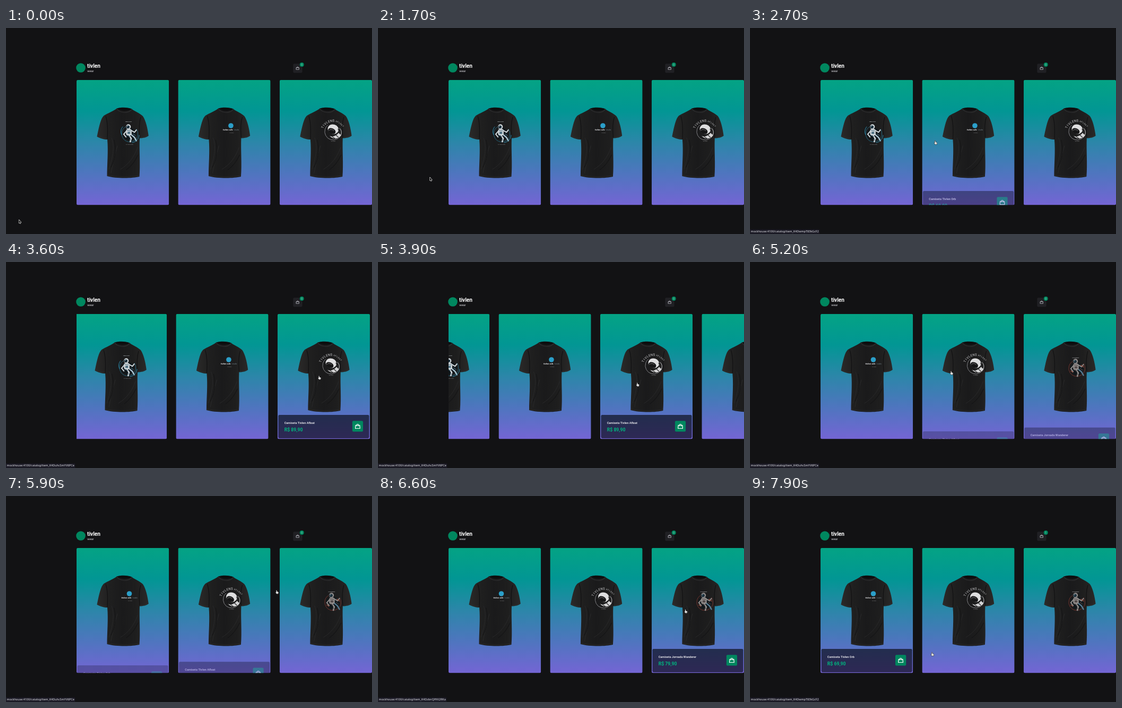
Recreate the animation shown at these times as an HTML page with a canvas. Size 690 by 388 pixels, loop 8000 ms.

```html
<!DOCTYPE html>
<html lang="pt-BR">
<head>
<meta charset="utf-8">
<title>Shop carousel</title>
<style>
html, body { margin: 0; width: 100%; height: 100%; overflow: hidden; background: #121214; }
canvas { display: block; width: 690px; height: 388px; }
</style>
</head>
<body>
<canvas id="stage" width="690" height="388"></canvas>
<script>
const stage = document.getElementById('stage').getContext('2d');
const layer = new OffscreenCanvas(690, 388).getContext('2d');
let ctx = stage;
const LOOP = 8000, STEP = 100;
const LEFT = 133, TOP = 97.8, CARD_W = 174.2, CARD_H = 235.6, PITCH = 191.43;
const SANS = 'Roboto, sans-serif';
const HOST = 'mockhouse:4100/catalog/item_';

const products = [
  { name: 'Camiseta Tivlen Abroad', price: 'R$ 79,90', id: 'K4DpqsWmVX3LTe', print: blueDiver },
  { name: 'Camiseta Tivlen Orb', price: 'R$ 69,90', id: 'K4DwmpT83kGcF2', print: orbPrint },
  { name: 'Camiseta Tivlen Afloat', price: 'R$ 89,90', id: 'K4DuhcSmYV6PCe', print: helmetPrint },
  { name: 'Camiseta Jornada Wanderer', price: 'R$ 79,90', id: 'K4DzbnQfHX2RKa', print: redDiver }
];

// product, time the pointer enters, time it leaves
const visits = [
  [0, 1900, 2490], [1, 2585, 3050], [2, 3130, 4510], [3, 4560, 5102], [2, 5118, 5250],
  [1, 5270, 5782], [2, 5799, 5900], [3, 5930, 6760], [2, 6785, 7020], [1, 7050, 9000]
];

// time, x, y of the pointer
const path = [
  [0, 26, 365], [1050, 26, 365], [1500, 70, 318], [1900, 136, 250], [2250, 220, 204],
  [2500, 306, 206], [2700, 350, 216], [3050, 505, 214], [3300, 586, 217], [3450, 595, 218],
  [3600, 591, 218], [4100, 427, 238], [4350, 412, 238], [4600, 540, 220], [4800, 600, 208],
  [5000, 575, 206], [5100, 506, 207], [5200, 380, 209], [5400, 265, 202], [5600, 235, 195],
  [5780, 300, 187], [5900, 511, 181], [6100, 598, 188], [6450, 608, 204], [6760, 517, 238],
  [7050, 305, 302], [7250, 284, 311], [7700, 284, 311], [7900, 344, 298], [8000, 350, 297]
];

const clamp = v => Math.min(1, Math.max(0, v));
const smooth = v => { v = clamp(v); return v * v * (3 - 2 * v); };
const cubic = v => { v = clamp(v); return v < 0.5 ? 4 * v ** 3 : 1 - 4 * (1 - v) ** 3; };

// Monotone spline through the pointer path
function slope(i, k) {
  if (i === 0 || i === path.length - 1) return 0;
  const rate = j => (path[j + 1][k] - path[j][k]) / (path[j + 1][0] - path[j][0]);
  const a = rate(i - 1), b = rate(i);
  return a * b <= 0 ? 0 : 2 * a * b / (a + b);
}
function pointer(t) {
  let i = 0;
  while (i < path.length - 2 && path[i + 1][0] <= t) i++;
  const a = path[i], b = path[i + 1], d = b[0] - a[0], u = (t - a[0]) / d, s = smooth(u);
  return [1, 2].map(k => a[k] + (b[k] - a[k]) * s +
    d * u * (1 - u) * ((1 - u) * slope(i, k) - u * slope(i + 1, k)));
}

function box(x, y, w, h, r, fill) {
  ctx.beginPath();
  ctx.roundRect(x, y, w, h, r);
  ctx.fillStyle = fill;
  ctx.fill();
}
function oval(x, y, rx, ry, fill, turn = 0) {
  ctx.beginPath();
  ctx.ellipse(x, y, rx, ry, turn, 0, 7);
  ctx.fillStyle = fill;
  ctx.fill();
}
function line(d, color, width) {
  ctx.strokeStyle = color;
  ctx.lineWidth = width;
  ctx.stroke(new Path2D(d));
}
function shape(d, fill) {
  ctx.fillStyle = fill;
  ctx.fill(new Path2D(d));
}
function text(str, x, y, size, fill, weight = 400, align = 'left', family = SANS) {
  ctx.font = `${weight} ${size}px ${family}`;
  ctx.textAlign = align;
  ctx.fillStyle = fill;
  ctx.fillText(str, x, y);
}
function gradient(x0, y0, x1, y1, colors) {
  const g = ctx.createLinearGradient(x0, y0, x1, y1);
  colors.forEach((c, i) => g.addColorStop(i / (colors.length - 1), c));
  return g;
}

function bag(x, y, size, color) {
  ctx.save();
  ctx.translate(x, y);
  ctx.scale(size / 10, size / 10);
  ctx.lineJoin = 'round';
  line('M-4.2 -2.2H4.2L4.6 4H-4.6Z', color, 1.3);
  line('M-2.1 -.2V-2.5C-2.1 -5.2 2.1 -5.2 2.1 -2.5V-.2', color, 1.1);
  ctx.restore();
}

const SHIRT = 'M76 151.500C70 156 58 161 51.500 165C46 170 43 182 38.500 204.500C44 208 52 210 58 210' +
  'C60 232 57.500 258 57.500 279C73 283.500 104 283.500 118.500 280C120.500 256 118 230 119 207.500' +
  'C126 207.500 132 206 135.800 203C134 189 130.500 174 125 166C119 160 111 158 104 152.500C96 149.500 84 149 76 151.500Z';

function shirt() {
  shape(SHIRT, gradient(38, 0, 136, 0, ['#2b2a29', '#1f1f1f', '#1a1a1b', '#1e1e1e', '#2a2928']));
  ctx.lineCap = 'round';
  line('M55 166C59 178 59 194 58 209', '#111112', 1.2);
  line('M121 168C117 180 118 195 119 206', '#111112', 1.2);
  line('M66 207C73 226 67 247 61 266M77 222C71 242 68 258 65 273M115 225C108 244 98 257 83 266', '#29292a', 1);
  line('M71 211C76 232 71 251 65 262M116 239C110 252 104 260 94 267', '#151516', 1.2);
  line('M40 203C45 206.500 52 208 57 208M120 206C126 206 131 204.500 134 202.500M58.500 277.500C74 281 104 281 117.500 278', '#353331', 0.6);
  shape('M76 151.500C83 149 97 149 104 152.500C99 157 82 157 76 151.500Z', '#0d0d0e');
  line('M76 152C80 160 98 162 104 153', '#2b2b2c', 1.5);
}

function diver(suit, shade, ring, leg, y) {
  ctx.save();
  ctx.translate(11.5, 24 + y);
  ctx.scale(0.88, 0.88);
  ctx.beginPath();
  ctx.arc(101, 199, 17.5, -0.6, 4.1);
  ctx.strokeStyle = ring;
  ctx.lineWidth = 1;
  ctx.stroke();
  oval(101, 200, 14, 13, '#10171b');
  ctx.lineCap = 'round';
  line('M94 193L88 200L93 206', suit, 2.3);
  line('M104 192L111 196L115 191', suit, 2.3);
  line('M100 203L104 209L102 216', suit, 3);
  line('M104 201L111 207L115 214', leg, 2.8);
  box(93, 189, 12, 13.5, 4, suit);
  box(96, 195, 6, 4.5, 1, shade);
  line('M94 202L101 205M95 192L103 193M108 199L113 203M101 211L104 213', shade, 1.2);
  oval(98, 184, 5.2, 5.2, suit);
  oval(97, 184.5, 3.6, 3.2, '#172c38');
  oval(95.8, 183.3, 1.1, 0.8, '#9cb8c4');
  ctx.restore();
}
function blueDiver() {
  text('DRIFT FAR', 98, 177, 2.4, '#c9d0d4', 700, 'center');
  diver('#cfd6da', '#4b6e80', '#236d88', '#a9c3d0', 0);
  line('M85 201C82 196 84 189 87 186M105 216C112 215 118 208 118 202', '#2c8cae', 1);
  text('by tivlen wear', 100, 220, 2.3, '#a5a5a8', 400, 'center');
}
function redDiver() {
  text('WANDERER', 98, 180.5, 2.4, '#b9b9bb', 700, 'center');
  diver('#8f8b8a', '#514848', '#7a3730', '#567b91', 1);
  line('M89 205L93 208M108 194L113 198', '#a0503e', 1.2);
}
function orbPrint() {
  oval(99.5, 184, 4.8, 4.8, '#2b9fc9');
  text('tivlen orb', 84.5, 193.4, 4.4, '#e6e6e8', 700);
  text('| studio', 104.5, 193.2, 3.2, '#71818a');
  text('by tivlen', 101, 198, 2.2, '#9a9a9d', 400, 'center');
}
function arcText(str, from, to, size, weight) {
  [...str].forEach((ch, i) => {
    const a = (from + (to - from) * i / (str.length - 1)) * Math.PI / 180;
    ctx.save();
    ctx.translate(101 + 20.5 * Math.cos(a), 197 + 20.5 * Math.sin(a));
    ctx.rotate(a + Math.PI / 2);
    text(ch, 0, 0, size, '#d4d4d6', weight, 'center');
    ctx.restore();
  });
}
function helmetPrint() {
  arcText('TIVLENS', -154, -89, 6, 400);
  arcText('AFLOAT', -75, -33, 4, 400);
  ctx.beginPath();
  ctx.arc(101, 195, 16, 0.3, 4);
  ctx.strokeStyle = '#8c8c8f';
  ctx.lineWidth = 0.9;
  ctx.stroke();
  oval(101, 190.5, 10.5, 8.8, '#dededf', 0.3);
  oval(98.5, 194, 7.5, 5, '#161617', 0.45);
  line('M93 193C95 190.500 99 190.500 102 193', '#8e8e90', 0.8);
  shape('M94 203C100 206 107 203 111 197.500L116 202C112 209 101 211 94 203Z', '#d4d4d5');
  line('M99 204.500L104 208M106 201.500L111 206M110 190L113 197', '#2a2a2b', 1.1);
  line('M113 189C117 192 117.500 198 115 202', '#c9c9cb', 1);
  text('by tivlen', 101, 213.6, 2.3, '#a9a9ab', 400, 'center');
}

function shown(index, t) {
  return Math.max(...visits.map(([i, from, to]) =>
    i === index ? smooth((t - from) / 200) * (1 - smooth((t - to) / 200)) : 0));
}

// Painted on its own layer so the panel fades as one piece
function footer(p, amount) {
  if (amount <= 0) return;
  layer.resetTransform();
  layer.clearRect(0, 0, 690, 388);
  layer.setTransform(stage.getTransform());
  layer.translate(0, 49 * (1 - amount));
  ctx = layer;
  box(1.5, 288, CARD_W - 3, 43.9, 2.3, 'rgba(0,0,0,.6)');
  text(p.name, 12.8, 304.6, 5.6, '#e1e1e6', 700);
  text(p.price, 12.8, 318.8, 8.7, '#00b37e', 700);
  box(141, 299.3, 20.2, 20.2, 2.2, '#00875f');
  bag(151.1, 309.7, 9.5, '#fff');
  ctx = stage;
  ctx.save();
  ctx.resetTransform();
  ctx.globalAlpha = amount;
  ctx.drawImage(layer.canvas, 0, 0);
  ctx.restore();
}

function card(p, x, amount) {
  ctx.save();
  ctx.translate(x, 0);
  ctx.beginPath();
  ctx.roundRect(0, TOP, CARD_W, CARD_H, 3);
  ctx.clip();
  ctx.fillStyle = gradient(0, TOP, 0, TOP + CARD_H, ['#04a384', '#029694', '#2c86a9', '#4f75bf', '#7465d4']);
  ctx.fillRect(0, TOP, CARD_W, CARD_H);
  shirt();
  p.print();
  footer(p, amount);
  ctx.restore();
}

function header(count) {
  oval(141, 75, 8.8, 8.8, '#00875f');
  text('tivlen', 153, 75.4, 10.1, '#fff', 700);
  text('wear', 153.2, 83.4, 5.7, '#e1e1e6');
  box(541.3, 67.3, 17.2, 17.2, 2.2, '#202024');
  bag(549.7, 75.8, 6, '#c4c4cc');
  oval(557.7, 69, 4.6, 4.6, '#121214');
  oval(557.7, 69, 4, 4, '#00875f');
  text(count, 557.7, 70.8, 5, '#a5d8c6', 400, 'center');
}

function status(t) {
  const last = visits.filter(v => v[1] + 50 < t).pop();
  if (!last) return;
  const font = '"Noto Sans", sans-serif';
  const url = HOST + products[last[0]].id;
  ctx.font = `400 5.45px ${font}`;
  box(0, 379.4, ctx.measureText(url).width + 3, 9, [0, 1, 0, 0], '#1c1b26');
  text(url, 1.6, 385.4, 5.45, '#e4e4ea', 400, 'left', font);
}

function cursor(t) {
  const [x, y] = pointer(t);
  ctx.save();
  ctx.translate(x, y);
  ctx.lineJoin = 'round';
  if (t < 1900) {
    const arrow = 'M-1.500 -3.500V2.300L-.2 1.200L.7 3.200L1.600 2.800L.8 .9H2.500Z';
    line(arrow, '#e8e8e8', 1.2);
    shape(arrow, '#111');
  } else {
    const hand = 'M-1.600 -3.600C-1 -4.200 -.4 -3.800 -.3 -3V-1L2.400 -.3C3.100 0 3.100 1 2.700 2.200L2.200 3.600H-1L-3 .8C-2.900 0 -2.200 0 -1.600 .6Z';
    ctx.scale(0.88, 0.88);
    line(hand, '#151515', 1.2);
    shape(hand, '#f4f4f4');
    line('M.2 1.200V2.700M1.400 1.300V2.700', '#333', 0.5);
  }
  ctx.restore();
}

function draw(t) {
  ctx.fillStyle = '#121214';
  ctx.fillRect(0, 0, 690, 388);
  const shift = PITCH * cubic((t - 3442) / 912);
  ctx.save();
  ctx.beginPath();
  ctx.rect(LEFT, 0, 690 - LEFT, 388);
  ctx.clip();
  products.forEach((p, i) => card(p, LEFT + i * PITCH - shift, shown(i, t)));
  ctx.restore();
  header(t < 7700 ? '0' : '1');
  status(t);
  cursor(t);
}

// The picture advances ten times a second
const start = performance.now();
function tick() {
  const t = (performance.now() - start) % LOOP;
  draw(Math.floor((t + 4) / STEP) * STEP % LOOP);
  requestAnimationFrame(tick);
}
tick();
</script>
</body>
</html>
```
